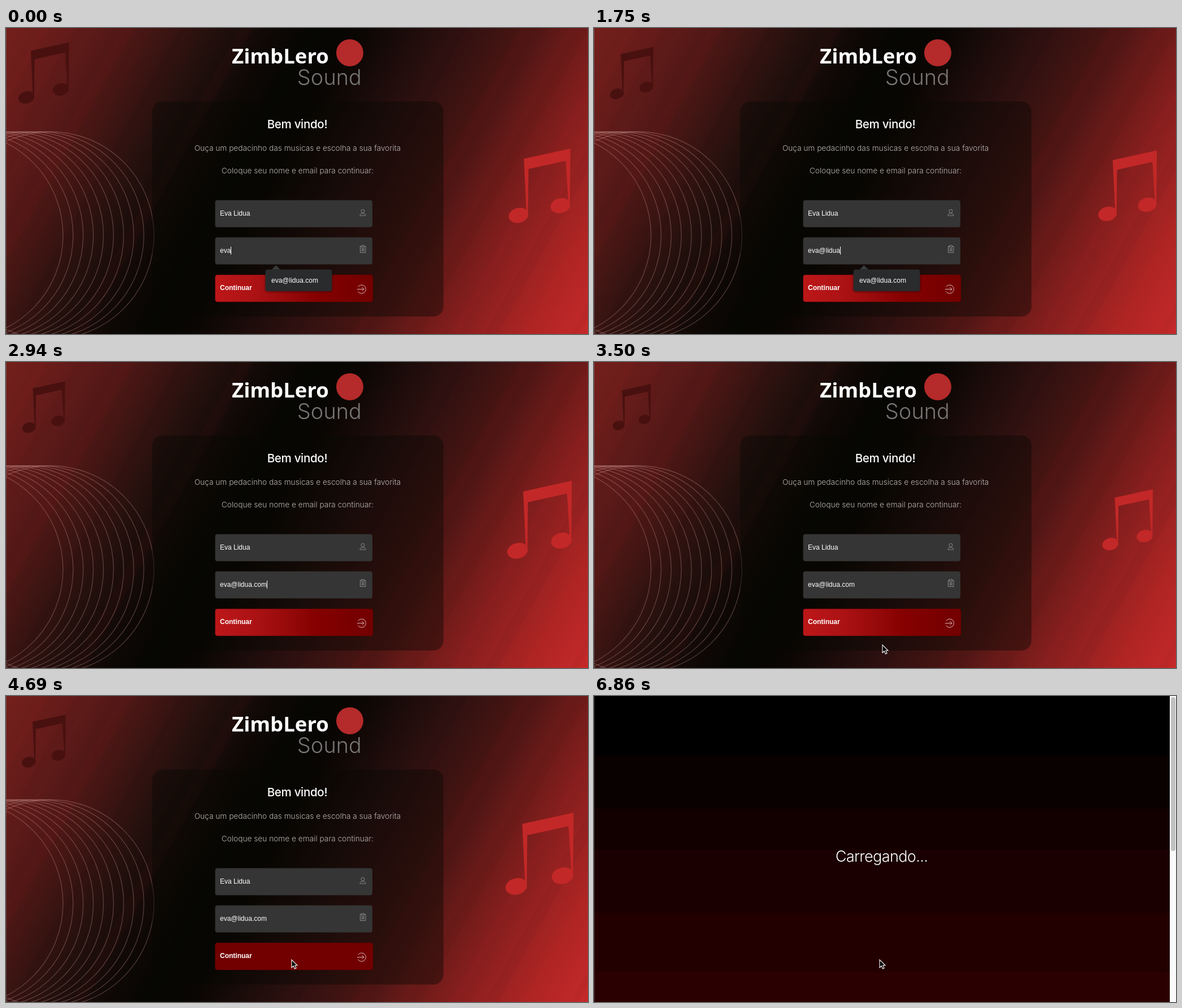
Write an HTML page with a canvas that moves like this. It is 1031 by 543 pixels and loops after 8 s.

```html
<!DOCTYPE html>
<html lang="pt">
<head>
<meta charset="utf-8">
<title>ZimbLero Sound</title>
<style>
  html, body { margin: 0; width: 100%; height: 100%; overflow: hidden; background: #000; }
  canvas { display: block; width: 1031px; height: 543px; }
</style>
</head>
<body>
<canvas id="stage" width="1031" height="543"></canvas>
<script>
const W = 1031, H = 543, LOOP = 8000, STEP = 70;
const ctx = document.getElementById('stage').getContext('2d');
const UI = 'Inter, "Noto Sans", sans-serif';
const FIELD = '"Liberation Sans", Arial, sans-serif';
const EMAIL = 'eva@lidua.com';
const LOADING_AT = 5110, SCROLL_AT = 6790, HOVER_AT = 4270, POPUP_END = 2870;
// moments at which each character after "eva" is typed
const KEYS = [420, 980, 1190, 1330, 1470, 1610, 1960, 2450, 2590, 2730];
const BEAT = 840;
const LEFT_BEAT = [[0, 1], [70, .854], [140, .753], [490, .865], [BEAT, 1]];
const RIGHT_BEAT = [[0, .905], [70, .86], [140, .742], [490, 1], [BEAT, .905]];
const POINTER = [[3010, 640, -18], [3150, 585, 170], [3360, 515, 448], [3500, 510, 502],
  [3640, 509, 511], [4060, 508, 508], [4200, 507, 486], [4410, 505, 468]];

// linear interpolation over [time, value, ...] rows
function track(rows, t, col = 1) {
  if (t <= rows[0][0]) return rows[0][col];
  for (let i = 1; i < rows.length; i++) {
    const a = rows[i - 1], b = rows[i];
    if (t <= b[0]) return a[col] + (b[col] - a[col]) * (t - a[0]) / (b[0] - a[0]);
  }
  return rows[rows.length - 1][col];
}

function text(str, x, y, font, color, align = 'left', spacing = 0) {
  ctx.font = font;
  ctx.fillStyle = color;
  ctx.textAlign = align;
  ctx.letterSpacing = spacing + 'px';
  ctx.fillText(str, x, y);
  ctx.letterSpacing = '0px';
}

function box(x, y, w, h, r, fill) {
  ctx.beginPath();
  ctx.roundRect(x, y, w, h, r);
  ctx.fillStyle = fill;
  ctx.fill();
}

function ramp(x0, y0, x1, y1, stops) {
  const g = ctx.createLinearGradient(x0, y0, x1, y1);
  stops.forEach(([at, color]) => g.addColorStop(at, color));
  return g;
}

function background() {
  const slope = .55, k = (W + slope * H) / (1 + slope * slope);
  ctx.fillStyle = ramp(0, 0, k, k * slope, [
    [0, '#741f1c'], [.1, '#611b19'], [.19, '#451614'], [.28, '#23100d'], [.36, '#0e0805'],
    [.41, '#060603'], [.47, '#090603'], [.54, '#1c0c0a'], [.61, '#301110'], [.7, '#4a1513'],
    [.75, '#661a18'], [.8, '#7c1d1c'], [.87, '#9a2221'], [.94, '#b42625'], [1, '#c62929']]);
  ctx.fillRect(0, 0, W, H);

  // faint slanted streaks
  for (let i = 0; i < 16; i++) {
    const x = 60 + i * 84 + 26 * Math.sin(i * 5.3), w = 14 + 12 * Math.abs(Math.sin(i * 2.1));
    if (x > 440 && x < 720) continue;
    ctx.fillStyle = i % 2 ? 'rgba(0,0,0,.03)' : 'rgba(200,45,40,.03)';
    ctx.beginPath();
    ctx.moveTo(x, 0);
    ctx.lineTo(x + w, 0);
    ctx.lineTo(x + w - slope * H, H);
    ctx.lineTo(x - slope * H, H);
    ctx.fill();
  }

  ctx.strokeStyle = 'rgba(215,165,158,.32)';
  ctx.lineWidth = 1.3;
  for (let i = 0; i < 10; i++) {
    ctx.beginPath();
    ctx.arc(-83 + i * 17.9, 368, 184, 0, Math.PI * 2);
    ctx.stroke();
  }
}

function note(x, y, scale, color) {
  ctx.save();
  ctx.translate(x, y);
  ctx.scale(scale, scale);
  ctx.fillStyle = color;
  ctx.beginPath();
  ctx.moveTo(-31, -53);
  ctx.lineTo(60, -73);
  ctx.lineTo(59, 38);
  ctx.ellipse(40.5, 39, 19.5, 14.5, -.25, 0, Math.PI * 1.85);
  ctx.lineTo(51, -49);
  ctx.lineTo(-22, -33);
  ctx.lineTo(-23, 58);
  ctx.ellipse(-41.5, 58, 19.5, 14.5, -.25, 0, Math.PI * 1.85);
  ctx.closePath();
  ctx.fill();
  ctx.restore();
}

function icon(path, color) {
  ctx.strokeStyle = color;
  ctx.lineWidth = 1;
  ctx.stroke(new Path2D(path));
}

function header() {
  text('ZimbLero', 400, 63, '700 36.5px "Open Sans", sans-serif', '#fff');
  text('Sound', 630, 101, '300 38px Inter, sans-serif', '#777575', 'right');
  ctx.beginPath();
  ctx.arc(609, 44, 24, 0, Math.PI * 2);
  ctx.fillStyle = '#b52a2a';
  ctx.fill();
}

function button(hover) {
  const fill = hover ? '#720000' : ramp(370, 0, 650, 0, [
    [0, '#bd1719'], [.25, '#ac1214'], [.5, '#930809'], [.64, '#850000'], [1, '#720000']]);
  box(370.5, 438, 279.5, 48, 4, fill);
  ctx.strokeStyle = 'rgba(90,0,0,.4)';
  ctx.lineWidth = 1;
  ctx.stroke();
  text('Continuar', 379, 465, 'bold 12px ' + FIELD, '#fff');
  icon('M623.6 459.5 A7.5 7.5 0 1 1 623.6 467.5 M622 463.5 H634 M630.5 460 L634 463.5 L630.5 467', '#d8b8b8');
}

function popup() {
  ctx.save();
  ctx.shadowColor = 'rgba(0,0,0,.45)';
  ctx.shadowBlur = 4;
  ctx.shadowOffsetY = 1;
  box(459.5, 428.5, 118, 38.5, 4, '#2a2b2d');
  ctx.restore();
  ctx.fillStyle = '#3a3b3c';
  ctx.beginPath();
  ctx.moveTo(471, 428.5);
  ctx.lineTo(478, 421);
  ctx.lineTo(486, 428.5);
  ctx.fill();
  text(EMAIL, 470, 452, '12px ' + FIELD, '#fff');
}

function form(t) {
  box(259, 130.5, 516, 381.5, 18, 'rgba(8,8,4,.42)');
  text('Bem vindo!', 516, 178, '500 20.6px ' + UI, '#fff', 'center', -.35);
  const small = '300 13.7px ' + UI;
  text('Ouça um pedacinho das musicas e escolha a sua favorita', 516.5, 218, small, '#b9b4b2', 'center');
  text('Coloque seu nome e email para continuar:', 516.5, 258, small, '#b9b4b2', 'center');

  box(370.5, 305.5, 278.5, 48, 4, '#353535');
  text('Eva Lidua', 379, 333, '12px ' + FIELD, '#fff');
  icon('M629 325 a3 3 0 1 0 6 0 a3 3 0 1 0 -6 0 M627 333 q0 -4 5 -4 t5 4 z', '#858585');

  box(370.5, 371.5, 278.5, 48, 4, '#353535');
  const typed = KEYS.filter(k => k <= t);
  const value = EMAIL.slice(0, 3 + typed.length);
  text(value, 379, 399, '12px ' + FIELD, '#fff');
  const since = t - (typed.length ? typed[typed.length - 1] : 0);
  if (since % 1000 < 500) {
    const end = 379 + ctx.measureText(value).width;
    ctx.fillStyle = '#fff';
    ctx.fillRect(Math.round(end), 388, 1, 14);
  }
  icon('M629.5 387.5 H627.5 V398.5 H637 V387.5 H634.5 M629.5 386 H634.5 V389 H629.5 Z' +
    ' M629.5 391.5 H635 M629.5 393.5 H635 M629.5 395.5 H635', '#8c8c8c');

  button(t >= HOVER_AT);
  if (t < POPUP_END) popup();
}

function pointer(t) {
  if (t < POINTER[0][0]) return;
  ctx.save();
  ctx.translate(track(POINTER, t, 1) + 1, track(POINTER, t, 2));
  const arrow = new Path2D('M0 0 V14 L3.2 11 L5.5 16 L8 15 L5.8 10 H10 Z');
  ctx.fillStyle = '#000';
  ctx.fill(arrow);
  ctx.strokeStyle = '#fff';
  ctx.lineWidth = 1.1;
  ctx.stroke(arrow);
  ctx.restore();
}

function loading() {
  const bands = [[0, '#000'], [105, '#090000'], [200, '#120000'], [272, '#1a0000'],
    [385, '#220000'], [490, '#2a0000']];
  bands.forEach(([y, color]) => {
    ctx.fillStyle = color;
    ctx.fillRect(0, y, W, H - y);
  });
  text('Carregando...', 509.5, 294, '300 27px ' + UI, '#fff', 'center', -.6);
}

function scrollbar(thumb) {
  ctx.fillStyle = '#fafafa';
  ctx.fillRect(1020, 0, 11, H);
  box(1022, 2, 8, thumb, 4, '#c1c1c1');
}

function draw(t) {
  ctx.clearRect(0, 0, W, H);
  if (t < LOADING_AT) {
    background();
    note(67, 80, .745 * track(LEFT_BEAT, t % BEAT), '#48110f');
    note(945.5, 280, track(RIGHT_BEAT, t % BEAT), '#c22827');
    header();
    form(t);
  } else {
    loading();
    scrollbar(t < SCROLL_AT ? 541 : 273);
  }
  ctx.fillStyle = 'rgba(120,110,110,.4)';
  ctx.fillRect(0, 0, 1, H);
  pointer(t);
}

const start = performance.now();
function tick() {
  const t = (performance.now() - start) % LOOP;
  draw(Math.floor(t / STEP) * STEP);
  requestAnimationFrame(tick);
}
tick();
</script>
</body>
</html>
```
